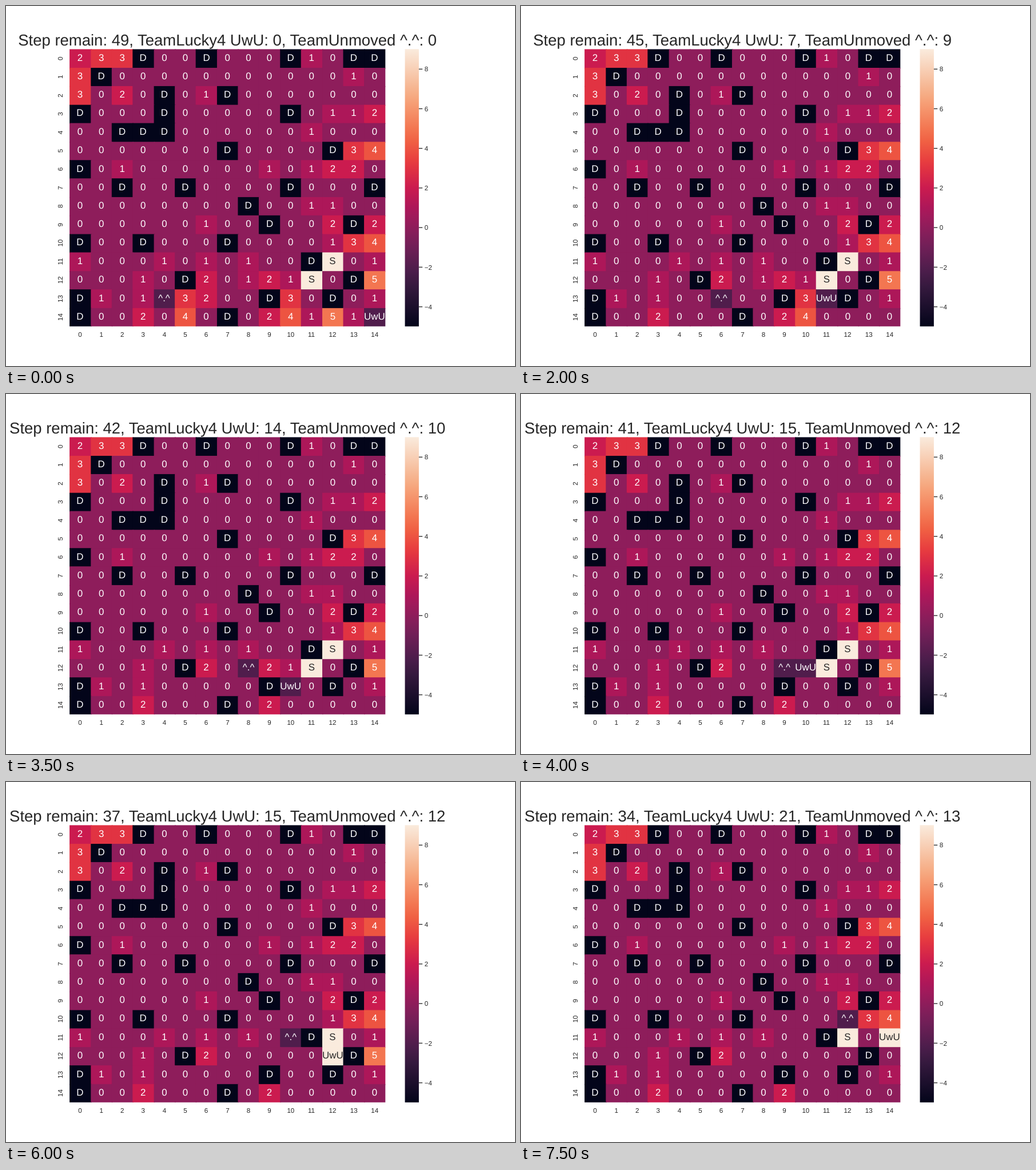
An HTML page for the animation above (8000 ms loop, 890 by 629 pixels).

```html
<!DOCTYPE html>
<html lang="en">
<head>
<meta charset="utf-8">
<title>Grid game</title>
<style>
  html, body { margin: 0; width: 100%; height: 100%; overflow: hidden; background: #fff; }
  svg { display: block; width: 890px; height: 629px; }
  text {
    font-family: "Liberation Sans", Arial, sans-serif;
    fill: #262626;
    white-space: pre;
    text-rendering: geometricPrecision;
  }
  .title { font-size: 36.11px; }
  .tick { font-size: 15.28px; }
  .cell { font-size: 22.22px; }
</style>
</head>
<body>
<svg id="stage" viewBox="0 0 1170 827" preserveAspectRatio="none"></svg>
<script>
// The chart is laid out on a 1170 x 827 sheet and scaled down to the stage.
const STEP_MS = 500, STEPS = 16, SIZE = 15;
const LEFT = 146.25, TOP = 99.24, CELL_W = 48.36, CELL_H = 42.453;
const RIGHT = LEFT + SIZE * CELL_W, BOTTOM = TOP + SIZE * CELL_H;

const BOARD = [
  "233D00D000D10DD",
  "3D0000000000010",
  "3020D01D0000000",
  "D000D00000D0112",
  "00DDD0000001000",
  "0000000D0000D34",
  "D01000000101220",
  "00D00D0000D000D",
  "00000000D001100",
  "000000100D002D2",
  "D00D000D0000134",
  "10001010100DS01",
  "00010D20121S0D5",
  "D10103200D30D01",
  "D002040D0241510"
];

const TEAMS = [
  { name: "TeamLucky4", face: "UwU", row: 14, col: 14, path: "LLLULDUUDRURRRU" },
  { name: "TeamUnmoved", face: "^.^", row: 13, col: 4, path: "RDRURRURURDUURR" }
];
const MOVES = { L: [0, -1], R: [0, 1], U: [-1, 0], D: [1, 0] };

const INK = "#262626", BRIGHT = "#faebdd", AGENT = "#501d4c";
const FILL = {
  D: "#03051a", S: BRIGHT, 0: "#8e1d5b", 1: "#ad1759",
  2: "#cb1b4f", 3: "#e13342", 4: "#ed5441", 5: "#f37651"
};
const RAMP = [
  [0, "#03051a"], [1 / 7, "#35193e"], [.2, "#4c1d4b"], [2 / 7, "#701f57"],
  [1 / 3, "#841e5a"], [.4, "#a11a5b"], [3 / 7, "#ad1759"], [.5, "#cb1b4f"],
  [4 / 7, "#e13342"], [.6, "#e83f3f"], [2 / 3, "#f06043"], [5 / 7, "#f37651"],
  [.8, "#f69c73"], [5 / 6, "#f6ab83"], [6 / 7, "#f6b48f"], [1, BRIGHT]
];

const stage = document.getElementById("stage");

function add(parent, tag, attrs) {
  const el = document.createElementNS("http://www.w3.org/2000/svg", tag);
  for (const key in attrs) el.setAttribute(key, attrs[key]);
  return parent.appendChild(el);
}

const edgeX = col => Math.round(LEFT + col * CELL_W);
const edgeY = row => Math.round(TOP + row * CELL_H);
const midX = col => LEFT + (col + .5) * CELL_W;
const midY = row => TOP + (row + .5) * CELL_H;

// Centres a text on x, with its start on a whole unit of the sheet.
function setLabel(el, x, label) {
  if (el.textContent === String(label)) return;
  el.textContent = label;
  el.setAttribute("x", Math.round(x - el.getComputedTextLength() / 2));
}

function drawAxes() {
  for (let i = 0; i < SIZE; i++) {
    setLabel(add(stage, "text", { class: "tick", y: 760 }), midX(i), i);
    const side = add(stage, "text", { class: "tick", y: 130, transform: "rotate(-90)" });
    setLabel(side, -midY(i), i);
  }
}

function drawColorBar() {
  const ramp = add(stage, "linearGradient", { id: "ramp", x1: 0, y1: 1, x2: 0, y2: 0 });
  for (const [offset, color] of RAMP) add(ramp, "stop", { offset, "stop-color": color });
  const x = 917, end = 949, y = edgeY(0);
  add(stage, "rect", { x, y, width: end - x, height: edgeY(SIZE) - y, fill: "url(#ramp)" });
  for (let v = -4; v <= 8; v += 2) {
    const tickY = Math.round(TOP + (9 - v) / 14 * (BOTTOM - TOP));
    add(stage, "path", { d: `M${end} ${tickY}h8.3`, stroke: INK, "stroke-width": 1.74 });
    add(stage, "text", { class: "tick", x: 962, y: tickY + 5.5 })
      .textContent = v < 0 ? "\u2212" + -v : v;
  }
}

// Each box reaches a little under its next neighbours, so no seams show.
function drawGrid() {
  const x = edgeX(0), y = edgeY(0);
  const clip = add(stage, "clipPath", { id: "field" });
  add(clip, "rect", { x, y, width: edgeX(SIZE) - x, height: edgeY(SIZE) - y });
  const boxes = add(stage, "g", { "clip-path": "url(#field)" });
  return BOARD.map((line, r) => [...line].map((_, c) => ({
    box: add(boxes, "rect", {
      x: edgeX(c), y: edgeY(r),
      width: edgeX(c + 1) - edgeX(c) + 2,
      height: edgeY(r + 1) - edgeY(r) + 2
    }),
    text: add(stage, "text", { class: "cell", y: Math.round(midY(r) + 5.5) })
  })));
}

drawAxes();
drawColorBar();
const cells = drawGrid();
const title = add(stage, "text", { class: "title", y: 91 });

function paint(row, col, label, fill) {
  const { box, text } = cells[row][col];
  box.style.fill = fill;
  text.style.fill = fill === BRIGHT ? INK : "#fff";
  setLabel(text, midX(col), label);
}

// Replays the game from the start up to the given step.
function play(step) {
  const board = BOARD.map(line => [...line]);
  const teams = TEAMS.map(t => ({ ...t, score: 0, shield: false }));
  for (let i = 0; i < step; i++) {
    for (const t of teams) {
      const [dr, dc] = MOVES[t.path[i]];
      t.row += dr;
      t.col += dc;
      const found = board[t.row][t.col];
      if (found === "D") continue;
      if (found === "S") t.shield = true;
      else t.score += +found;
      board[t.row][t.col] = "0";
    }
  }
  return { board, teams };
}

function show(step) {
  const { board, teams } = play(step);
  board.forEach((line, r) => line.forEach((v, c) => paint(r, c, v, FILL[v])));
  for (const t of teams) paint(t.row, t.col, t.face, t.shield ? BRIGHT : AGENT);
  const scores = teams.map(t => `${t.name} ${t.face}: ${t.score}`);
  setLabel(title, (LEFT + RIGHT) / 2, [`Step remain: ${49 - step}`, ...scores].join(", "));
}

let shown = -1;
const start = performance.now();
function tick() {
  const step = Math.floor(Math.max(0, performance.now() - start) / STEP_MS) % STEPS;
  if (step !== shown) show(shown = step);
  requestAnimationFrame(tick);
}
tick();
</script>
</body>
</html>
```
